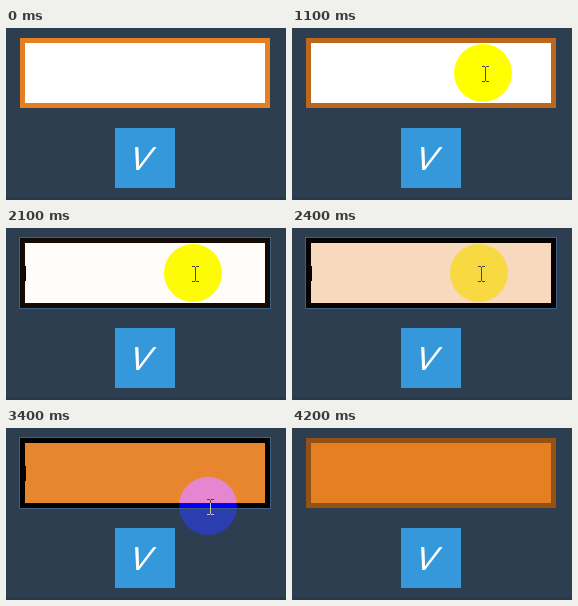
Recreate the animation shown at these times as an HTML page with a canvas. Size 280 by 172 pixels, loop 4.3 s.

```html
<!DOCTYPE html>
<html lang="en">
<head>
<meta charset="utf-8">
<title>Input hover and focus</title>
<style>
  html, body { margin: 0; overflow: hidden; background: #2c3e50; }
  canvas { display: block; }
</style>
</head>
<body>
<canvas id="stage" width="280" height="172"></canvas>
<script>
const ctx = document.getElementById('stage').getContext('2d');
const LOOP = 4300, STEP = 100, FADE = 2000;
const HOVER = 800, FOCUS = 2000, LEAVE = 3450, BLUR = 4150;
const ORANGE = [230, 126, 34], BLACK = [0, 0, 0], WHITE = [255, 255, 255];

// Pointer highlight: time, x, y
const path = [
  [800, 252, 54], [900, 228, 51], [1000, 204, 47], [1100, 191, 45], [1200, 187, 45],
  [3200, 187, 45], [3300, 190, 54], [3400, 202, 78], [3500, 236, 108], [3600, 284, 121], [3700, 320, 121]
];

const mix = (a, b, k) => a.map((v, i) => v + (b[i] - v) * k);
const rgb = c => `rgb(${c.map(Math.round)})`;

function box(color, x, y, w, h) {
  ctx.fillStyle = color;
  ctx.fillRect(x, y, w, h);
}

// CSS "ease": cubic-bezier(.25, .1, .25, 1)
function ease(p) {
  if (p <= 0 || p >= 1) return p <= 0 ? 0 : 1;
  const bezier = (a, b, s) => 3 * a * s * (1 - s) ** 2 + 3 * b * s * s * (1 - s) + s ** 3;
  let lo = 0, hi = 1;
  for (let i = 0; i < 20; i++) {
    const mid = (lo + hi) / 2;
    if (bezier(.25, .25, mid) < p) lo = mid; else hi = mid;
  }
  return bezier(.1, 1, lo);
}

const fade = (t, start) => ease((t - start) / FADE);

function drawField(t) {
  const focused = t >= FOCUS && t < BLUR;
  if (focused) box('#3e5f88', 13, 9, 252, 72);
  box(rgb(mix(ORANGE, BLACK, fade(t, HOVER) - fade(t, LEAVE))), 14, 10, 250, 70);
  box(rgb(mix(WHITE, ORANGE, fade(t, FOCUS))), 19, 15, 240, 60);
  if (focused && (t - FOCUS) % 1000 < 500) box('#000', 19, 38, 1, 15);
}

function drawButton() {
  box('#3498db', 109, 100, 60, 60);
  ctx.save();
  ctx.translate(131.5, 142);
  ctx.transform(1, 0, -.36, 1, 0, 0);
  ctx.font = '32px Lato, sans-serif';
  ctx.textAlign = 'center';
  ctx.fillStyle = '#fff';
  ctx.fillText('V', 0, 0);
  ctx.restore();
}

function drawPointer(t) {
  const next = path.findIndex(p => p[0] > t);
  if (next < 1) return;
  const a = path[next - 1], b = path[next];
  const [, x, y] = mix(a, b, (t - a[0]) / (b[0] - a[0]));

  ctx.globalCompositeOperation = 'difference';
  ctx.fillStyle = '#00f';
  ctx.beginPath();
  ctx.arc(x, y, 29, 0, 2 * Math.PI);
  ctx.fill();
  ctx.globalCompositeOperation = 'source-over';

  // I-beam, dark over the field and light below it
  const ink = ctx.createLinearGradient(0, 75, 0, 75.01);
  ink.addColorStop(0, '#4a4640');
  ink.addColorStop(1, '#c8c8b8');
  const cx = Math.round(x) + 2, top = Math.round(y) - 7;
  box(ink, cx, top + 1, 1, 14);
  for (const row of [top, top + 15]) {
    box(ink, cx - 3, row, 3, 1);
    box(ink, cx + 1, row, 3, 1);
  }
}

function draw(now) {
  const t = Math.floor(now % LOOP / STEP) * STEP;
  box('#2c3e50', 0, 0, 280, 172);
  box('#283849', 0, 169, 280, 3);
  drawField(t);
  drawButton();
  drawPointer(t);
  requestAnimationFrame(() => draw(performance.now() - start));
}

const start = performance.now();
draw(0);
</script>
</body>
</html>
```
